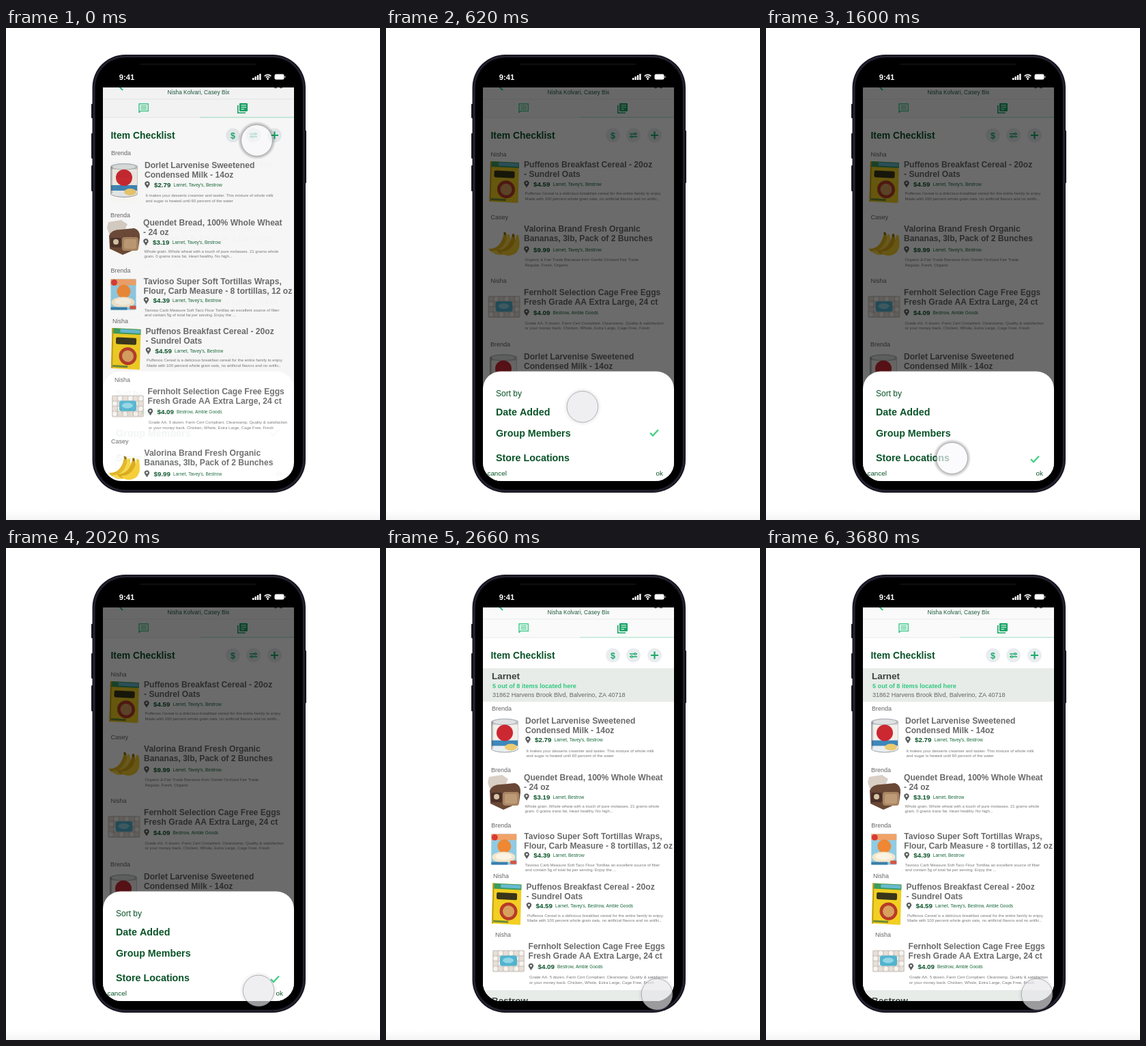
An HTML page with a canvas for the animation above (3.7 s loop, 548 px wide and 720 px high).

```html
<!DOCTYPE html>
<html lang="en">
<head>
<meta charset="utf-8">
<title>Checklist sorting</title>
<style>
html, body { margin: 0; width: 100%; height: 100%; overflow: hidden; background: #fff; }
canvas { display: block; width: 548px; height: 720px; }
</style>
</head>
<body>
<canvas id="stage"></canvas>
<script>
const W = 548, H = 720, LOOP = 3700;
const DPR = window.devicePixelRatio || 1;
const DARK = '#0a5429', GREEN = '#2fc27c', GREY = '#6a6a6a';
const SCREEN = { x: 142, y: 87, w: 280, h: 576 };
let c;

function prepare(canvas) {
  canvas.width = W * DPR;
  canvas.height = H * DPR;
  const context = canvas.getContext('2d');
  context.scale(DPR, DPR);
  return context;
}

// y is the middle of the capitals
function text(str, x, y, size, color, weight = 'normal', align = 'left') {
  c.font = `${weight} ${size}px "Liberation Sans", Arial, sans-serif`;
  c.fillStyle = color;
  c.textAlign = align;
  c.fillText(str, x, y + size * 0.35);
}

function rect(x, y, w, h, color, r = 0) {
  c.fillStyle = color;
  c.beginPath();
  c.roundRect(x, y, w, h, r);
  c.fill();
}

function oval(x, y, rx, ry, color) {
  c.fillStyle = color;
  c.beginPath();
  c.ellipse(x, y, rx, ry, 0, 0, Math.PI * 2);
  c.fill();
}

const disc = (x, y, r, color) => oval(x, y, r, r, color);

function line(points, color, width, cap = 'butt') {
  c.strokeStyle = color;
  c.lineWidth = width;
  c.lineCap = cap;
  c.lineJoin = 'miter';
  c.beginPath();
  for (let i = 0; i < points.length; i += 2) c.lineTo(points[i], points[i + 1]);
  c.stroke();
}

// Product pictures, each drawn from its own top left corner

function can() {
  oval(20, 44, 20, 6, '#9b9ea3');
  rect(0, 5, 40, 39, '#c9ccd0');
  rect(1, 9, 38, 35, '#f3efeb');
  oval(20, 44, 19, 5, '#e9eef2');
  oval(20, 5, 20, 5, '#b7babd');
  oval(20, 5, 17, 3.5, '#dfe1e2');
  rect(1, 32, 38, 8, '#3d87bb');
  disc(20, 21, 12, '#cb2832');
  oval(29, 42, 9, 5, '#eccb72');
  rect(0, 5, 3, 39, 'rgba(70,70,80,.3)');
}

function bread() {
  c.fillStyle = '#d9cfc5';
  c.beginPath();
  c.moveTo(2, 4); c.lineTo(21, 1); c.lineTo(30, 7); c.lineTo(25, 18);
  c.lineTo(5, 27); c.lineTo(0, 12); c.fill();
  c.fillStyle = '#6a4836';
  c.beginPath();
  c.moveTo(3, 24); c.quadraticCurveTo(6, 15, 20, 15); c.lineTo(40, 13);
  c.quadraticCurveTo(49, 16, 48, 27); c.lineTo(46, 42); c.lineTo(23, 52);
  c.lineTo(4, 43); c.fill();
  rect(22, 26, 24, 20, '#a98564', 4);
  rect(25, 29, 18, 14, '#bd9b77', 3);
  rect(5, 27, 16, 14, '#4a3028', 2);
  disc(13, 33, 4, '#d7c4a5');
}

function tortillas() {
  rect(0, 0, 37, 45, '#8fcbe4', 1);
  rect(0, 0, 37, 9, '#f1a268');
  disc(5, 5, 4.5, '#d83a36');
  disc(19, 18, 10, '#ef8733');
  oval(18, 34, 17, 8, '#f4e5c9');
  oval(18, 33, 12, 5, '#fbf4e4');
  rect(0, 41, 24, 4, '#387fac');
  rect(28, 39, 9, 5, '#d45542');
}

function cereal() {
  c.save();
  c.transform(1, 0.05, -0.025, 1, 1.5, 0);
  rect(0, 0, 42, 59, '#f2cf22', 1);
  rect(0, 0, 42, 8, '#3c9c5d');
  rect(12, 1, 29, 5, '#67bad3');
  rect(6, 13, 30, 10, '#38351a', 2);
  disc(24, 40, 13, '#b83b28');
  disc(24, 40, 8.5, '#d8a05d');
  rect(2, 54, 22, 3, '#6d8c38');
  rect(0, 0, 2, 59, '#c39e13');
  c.restore();
}

function eggs() {
  rect(0, 0, 47, 32, '#d3cec9', 2);
  for (let row = 0; row < 4; row++) {
    for (let col = 0; col < 6; col++) {
      oval(4.5 + col * 7.6, 4.5 + row * 7.6, 3.1, 3.2, (row + col) % 2 ? '#f8f5f1' : '#e9dfd5');
    }
  }
  rect(11, 8, 25, 15, '#51b4cf', 3);
  oval(23, 15, 8, 4, '#93d5e4');
}

function bananas() {
  const curve = (dx, dy, color) => {
    c.fillStyle = color;
    c.beginPath();
    c.moveTo(23 + dx, dy);
    c.quadraticCurveTo(19 + dx, 25 + dy, dx, 24 + dy);
    c.quadraticCurveTo(7 + dx, 34 + dy, 20 + dx, 28 + dy);
    c.quadraticCurveTo(31 + dx, 22 + dy, 26 + dx, dy);
    c.fill();
  };
  curve(0, 0, '#e3b51e');
  curve(5, 3, '#f6d545');
  curve(12, 2, '#dba915');
  curve(18, 4, '#f5cd30');
  line([23, 0, 25, 4], '#75631f', 2);
  line([36, 3, 37, 7], '#75631f', 2);
}

const BASIC = "Larnet, Tavey's, Bestrow";

// who, art: offsets from the first title line; price, note: vertical offsets
const GOODS = {
  milk: {
    by: 'Brenda', who: [-49, -18], draw: can, art: [-50, -3], price: 28.5, note: 44, cost: '$2.79',
    title: ['Dorlet Larvenise Sweetened', 'Condensed Milk - 14oz'],
    notes: ['It makes your desserts creamier and tastier. This mixture of whole milk',
      'and sugar is heated until 60 percent of the water']
  },
  bread: {
    by: 'Brenda', who: [-48, -11], draw: bread, art: [-53, -5], price: 28.5, note: 41.5, cost: '$3.19',
    title: ['Quendet Bread, 100% Whole Wheat', '- 24 oz'],
    notes: ['Whole grain. Whole wheat with a touch of pure molasses. 21 grams whole',
      'grain. 0 grams trans fat. Heart healthy. No high...']
  },
  wraps: {
    by: 'Brenda', who: [-48, -15.5], draw: tortillas, art: [-48, -3], price: 28.5, note: 42, cost: '$4.39',
    title: ['Tavioso Super Soft Tortillas Wraps,', 'Flour, Carb Measure - 8 tortillas, 12 oz'],
    notes: ['Tavioso Carb Measure Soft Taco Flour Tortillas an excellent source of fiber',
      'and contain 5g of total fat per serving. Enjoy the ...']
  },
  cereal: {
    by: 'Nisha', who: [-48.5, -15.5], draw: cereal, art: [-50.5, -5], price: 28.5, note: 42, cost: '$4.59',
    title: ['Puffenos Breakfast Cereal - 20oz', '- Sundrel Oats'],
    notes: ['Puffenos Cereal is a delicious breakfast cereal for the entire family to enjoy.',
      'Made with 100 percent whole grain oats, no artificial flavors and no artific..']
  },
  eggs: {
    by: 'Nisha', who: [-48.5, -17], draw: eggs, art: [-52.5, 5.5], price: 30, note: 45, cost: '$4.09',
    title: ['Fernholt Selection Cage Free Eggs', 'Fresh Grade AA Extra Large, 24 ct'],
    notes: ['Grade AA. 5 dozen. Farm Cert Compliant. Clearstamp. Quality & satisfaction',
      'or your money back. Chicken, Whole, Extra Large, Cage Free, Fresh']
  },
  bananas: {
    by: 'Casey', who: [-48.5, -17.5], draw: bananas, art: [-52, 5], price: 30.5, note: 45, cost: '$9.99',
    title: ['Valorina Brand Fresh Organic', 'Bananas, 3lb, Pack of 2 Bunches'],
    notes: ['Organic & Fair Trade Bananas from Gentle Orchard Fair Trade',
      'Regular, Fresh, Organic']
  }
};

function pin(x, y) {
  c.fillStyle = '#5b5f5d';
  c.beginPath();
  c.arc(x, y - 1.5, 3.7, Math.PI * 0.9, Math.PI * 2.1);
  c.lineTo(x, y + 5);
  c.fill();
  disc(x, y - 1.6, 1.4, '#fff');
}

function item(name, x, y, stores = BASIC) {
  const g = GOODS[name];
  c.save();
  c.translate(x + g.art[0], y + g.art[1]);
  g.draw();
  c.restore();
  text(g.by, x + g.who[0], y + g.who[1], 9, '#666');
  g.title.forEach((row, i) => text(row, x, y + i * 14.2, 12.1, GREY, 'bold'));
  pin(x + 4, y + g.price);
  text(g.cost, x + 14, y + g.price, 9.8, DARK, 'bold');
  text(stores, x + 42.5, y + g.price, 6.55, '#17683a');
  g.notes.forEach((row, i) => text(row, x + 1.5, y + g.note + i * 7.6, 6, '#777'));
}

function header() {
  rect(142, 87, 280, 44, '#fafafb');
  line([171, 91, 166, 86, 171, 81], GREEN, 2);
  disc(395, 86, 2.4, '#666');
  disc(403, 86, 2.4, '#666');
  text('Nisha Kolvari, Casey Bix', 282, 94.5, 8.3, '#1d5a3c', 'normal', 'center');
  rect(142, 103.5, 280, 1, '#e9ebea');
  rect(142, 130.5, 142, 1, '#e9ebea');
  rect(284, 130, 138, 1.5, '#bfe9d4');

  line([195, 124, 195, 111, 208.3, 111, 208.3, 121.5, 197, 121.5, 195, 124], '#45cb8d', 1.5);
  for (const y of [113.9, 116.3, 118.7]) line([197.3, y, 206, y], '#45cb8d', 1.2);
  line([339.8, 113, 339.8, 124.2, 351, 124.2], '#18a565', 1.6);
  rect(342, 110, 12, 12, '#18a565', 1.2);
  for (const [y, x] of [[113, 352], [116, 352], [119, 349]]) line([344.5, y, x, y], '#fff', 1.2);

  text('Item Checklist', 153.5, 157.3, 13.9, DARK, 'bold');
  for (const x of [332.5, 362.5, 393.5]) disc(x, 157, 10.5, '#e9edf0');
  text('$', 332.5, 157.2, 12.5, '#1cab69', 'bold', 'center');
  for (const [y, knob] of [[155, 365], [159, 360]]) {
    line([357, y, 368, y], '#1cab69', 1.3);
    disc(knob, y, 1.9, '#1cab69');
    disc(knob, y, 0.8, '#e9edf0');
  }
  line([388, 157, 399, 157], '#1cab69', 2.2);
  line([393.5, 151.5, 393.5, 162.5], '#1cab69', 2.2);
}

function sheet(checkX, checkY) {
  rect(SCREEN.x, SCREEN.y, SCREEN.w, SCREEN.h, 'rgba(0,0,0,.58)');
  rect(142, 502.5, 280, 170, '#fff', [26, 26, 0, 0]);
  text('Sort by', 161, 535, 12, DARK);
  text('Date Added', 161, 561.5, 14.3, DARK, 'bold');
  text('Group Members', 161, 593, 14.3, DARK, 'bold');
  text('Store Locations', 161, 629, 14.3, DARK, 'bold');
  text('cancel', 148.5, 652, 9.8, DARK);
  text('ok', 395.5, 652, 9.8, DARK);
  line([checkX - 6, checkY, checkX - 2, checkY + 4, checkX + 6, checkY - 4.5], '#47cf85', 2.4);
}

function byDate() {
  item('milk', 203, 201);
  item('bread', 201, 285);
  item('wraps', 201.5, 370.5);
  item('cereal', 204.5, 444);
  item('eggs', 207.5, 532, 'Bestrow, Amble Goods');
  item('bananas', 202.5, 622);
}

function byMember() {
  item('cereal', 202, 200);
  item('bananas', 202, 294);
  item('eggs', 202, 386.5, 'Bestrow, Amble Goods');
  item('milk', 202, 480.5);
}

function byStore() {
  rect(142, 176, 280, 49, '#e7ece8');
  text('Larnet', 155, 187.5, 13.4, '#3a423d', 'bold');
  text('5 out of 8 items located here', 156, 202, 9.1, '#31c880', 'bold');
  text('31862 Harvens Brook Blvd, Balverino, ZA 40718', 156, 214.5, 9.05, '#666');
  item('milk', 204, 252.5);
  item('bread', 202, 336, 'Larnet, Bestrow');
  item('wraps', 202.3, 421.5, 'Larnet, Bestrow');
  item('cereal', 205.5, 495.5, BASIC + ', Amble Goods');
  item('eggs', 208.5, 583, 'Bestrow, Amble Goods');
  rect(142, 647, 280, 20, '#e7ece8');
  text('Bestrow', 155, 662, 13.4, '#3a423d', 'bold');
}

function scene(list, check) {
  const canvas = document.createElement('canvas');
  c = prepare(canvas);
  c.beginPath();
  c.roundRect(SCREEN.x, SCREEN.y, SCREEN.w, SCREEN.h, [0, 0, 27, 27]);
  c.clip();
  rect(SCREEN.x, SCREEN.y, SCREEN.w, SCREEN.h, '#fff');
  header();
  list();
  if (check) sheet(...check);
  return canvas;
}

function phone() {
  const canvas = document.createElement('canvas');
  c = prepare(canvas);
  rect(0, 0, W, H, '#fff');
  const fade = c.createLinearGradient(0, 706, 0, H);
  fade.addColorStop(0, '#fff');
  fade.addColorStop(1, '#f4f4f4');
  rect(0, 706, W, 14, fade);

  for (const [y, h] of [[111, 21], [154, 37], [201, 38]]) rect(125, y, 4, h, '#14131b', 1);
  rect(437, 150, 3, 77, '#14131b', 1);
  rect(126.5, 39, 312.5, 641, '#171621', 48);
  c.strokeStyle = '#33313f';
  c.lineWidth = 1;
  c.beginPath();
  c.roundRect(129, 41.5, 307.5, 636, 46);
  c.stroke();
  rect(131, 43.5, 303.5, 632, '#000', 44);
  rect(196, 52.5, 170, 1, '#1d1d22');

  text('9:41', 177, 72, 11.2, '#fff', 'bold', 'center');
  for (let i = 0; i < 4; i++) rect(361 + i * 3.4, 73 - i * 2, 2.4, 3 + i * 2, '#fff', 0.6);
  c.strokeStyle = '#fff';
  c.lineWidth = 1.6;
  for (const r of [3.6, 6.6]) {
    c.beginPath();
    c.arc(383.5, 75, r, Math.PI * 1.24, Math.PI * 1.76);
    c.stroke();
  }
  disc(383.5, 74.5, 1.4, '#fff');
  rect(393.5, 67.5, 14, 8, '#fff', 2.2);
  rect(408.2, 70, 1.3, 3, '#aaa', 0.6);
  return canvas;
}

function ramp(t, from, to) {
  const x = Math.min(1, Math.max(0, (t - from) / (to - from)));
  return x * x * (3 - 2 * x);
}

function touch(t) {
  const down = ramp(t, 10, 830), across = ramp(t, 1650, 2180);
  const x = 367.5 - 95 * down + 124.5 * across;
  const y = 164.5 + 465 * down + 23.5 * across;
  const press = (1 - ramp(t, 40, 200))
    + ramp(t, 1110, 1200) * (1 - ramp(t, 1620, 1760))
    + ramp(t, 2190, 2280) * (1 - ramp(t, 2380, 2560));
  const halo = c.createRadialGradient(x, y, 22, x, y, 28);
  halo.addColorStop(0, `rgba(0,0,0,${0.08 + 0.22 * press})`);
  halo.addColorStop(1, 'rgba(0,0,0,0)');
  c.fillStyle = halo;
  c.beginPath();
  c.arc(x, y, 28, 0, Math.PI * 2);
  c.arc(x, y, 22.5, 0, Math.PI * 2, true);
  c.fill();
  const tone = 232 + 18 * press;
  disc(x, y, 22.8, `rgba(${tone},${tone},${tone + 3},.67)`);
  c.strokeStyle = `rgba(125,125,140,${0.6 - 0.25 * press})`;
  c.lineWidth = 0.9;
  c.beginPath();
  c.arc(x, y, 22.8, 0, Math.PI * 2);
  c.stroke();
}

const frame = phone();
const scenes = [
  scene(byDate),
  scene(byMember, [393, 592.5]),
  scene(byMember, [394, 631]),
  scene(byStore)
];
const stage = prepare(document.getElementById('stage'));

function draw(t) {
  c = stage;
  c.globalAlpha = 1;
  c.drawImage(frame, 0, 0, W, H);
  const shown = [1, ramp(t, -42, 270), ramp(t, 1200, 1500), ramp(t, 2327, 2639)];
  scenes.forEach((canvas, i) => {
    c.globalAlpha = shown[i];
    c.drawImage(canvas, 0, 0, W, H);
  });
  c.globalAlpha = 1;
  touch(t);
}

const start = performance.now();
function tick() {
  draw((performance.now() - start) % LOOP);
  requestAnimationFrame(tick);
}
tick();
</script>
</body>
</html>
```
